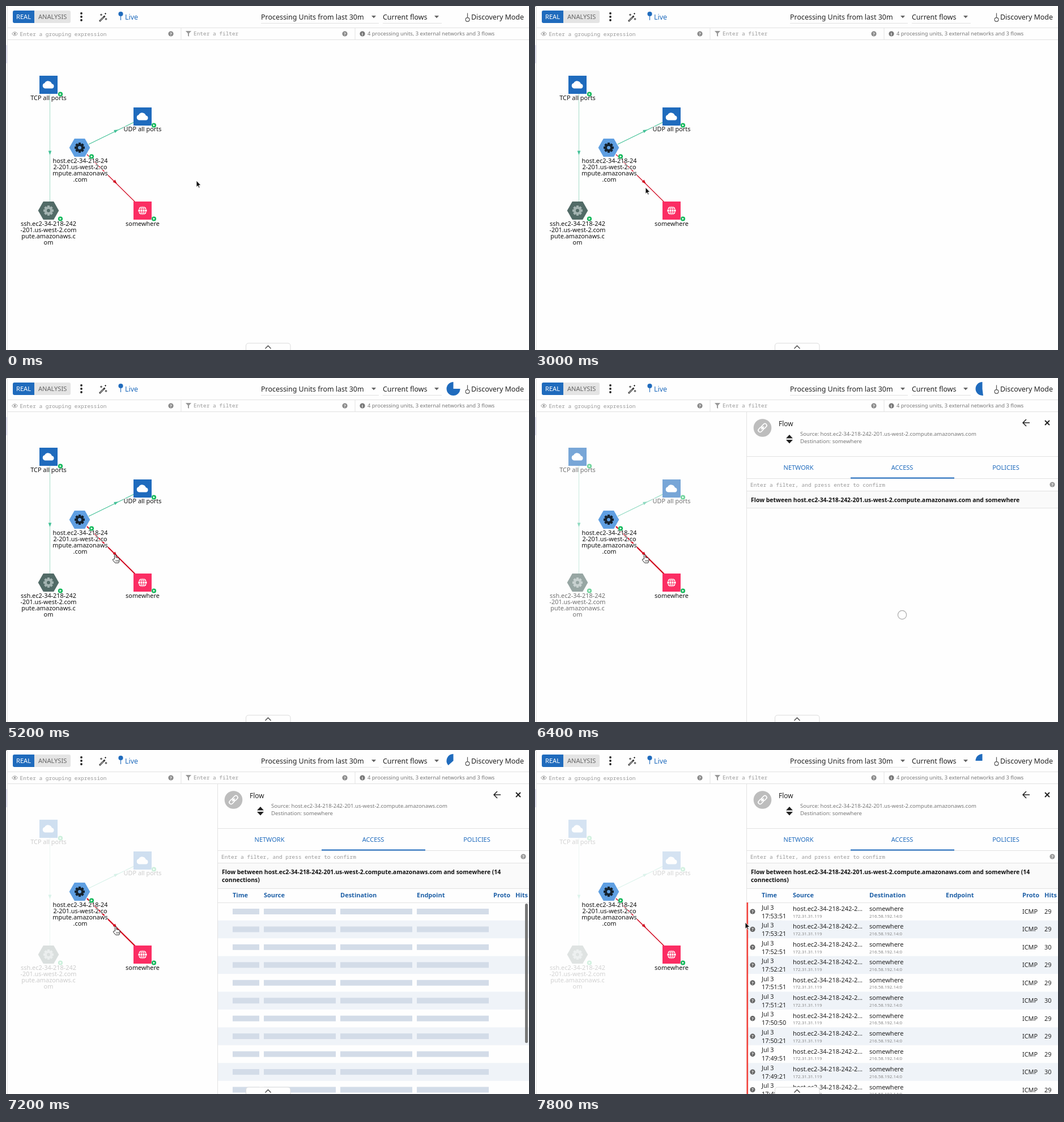
An HTML page for the animation above (8 s loop, 923x607 px).

```html
<!DOCTYPE html>
<html lang="en">
<head>
<meta charset="utf-8">
<title>Flow inspector</title>
<style>
  html, body { margin: 0; width: 100%; height: 100%; overflow: hidden; background: #fefefe; }
  svg { display: block; width: 923px; height: 607px; font-family: "Noto Sans", sans-serif; }
  .mono { font-family: "Noto Sans Mono", monospace; }
  .label { font-size: 10.9px; text-anchor: middle; paint-order: stroke; stroke: #fefefe; stroke-width: 2px; }
</style>
</head>
<body>
<svg id="stage" viewBox="0 0 923 607"></svg>
<script>
const BLUE = '#1f6bbd', LINE = '#e2e2e2', GREEN = '#43c197';
const HOST = 'host.ec2-34-218-242-201.us-west-2.compute.amazonaws.com';

const text = (x, y, size, str, fill = '#222', attrs = '') =>
  `<text x="${x}" y="${y}" font-size="${size}" fill="${fill}" ${attrs}>${str}</text>`;
const rect = (x, y, w, h, fill, attrs = '') =>
  `<rect x="${x}" y="${y}" width="${w}" height="${h}" fill="${fill}" ${attrs}/>`;
const circle = (x, y, r, fill, attrs = '') =>
  `<circle cx="${x}" cy="${y}" r="${r}" fill="${fill}" ${attrs}/>`;
const path = (d, fill = 'none', attrs = '') => `<path d="${d}" fill="${fill}" ${attrs}/>`;
const stroke = (color, width = 1) => `stroke="${color}" stroke-width="${width}"`;
const line = (d, color = LINE, width = 1) => path(d, 'none', stroke(color, width));
const group = (id, body, attrs = '') => `<g id="${id}" ${attrs}>${body}</g>`;
const at = (x, y, body, extra = '') => `<g transform="translate(${x} ${y}) ${extra}">${body}</g>`;
const mark = (x, y, sign, fill = '#8a8a8a') => circle(x, y, 4.6, fill) +
  text(x, y + 2.8, 7.5, sign, '#fff', 'text-anchor="middle" font-weight="700"');
const caret = x => path(`M${x - 4} 17h8l-4 4.5z`, '#666');

// Graph nodes
const badge = (x, y) => circle(x, y, 4.6, '#fff') + circle(x, y, 4.1, '#12b85a') +
  path(`M${x - 1.3} ${y - 2}l3.4 2l-3.4 2z`, '#fff');
const labels = (x, y, lines) => lines.map((s, i) => text(x, y + 11 * i, 10.9, s, '#111', 'class="label"')).join('');
const cloud = path('M-6 6.5a4.8 4.8 0 0 1-.7-9.4a6.8 6.8 0 0 1 12.6 1.2a4.2 4.2 0 0 1 .6 8.2z', '#fff');
const globe = circle(0, 0, 7.6, '#fff') +
  line('M-8 -2.6H8M-8 2.6H8M0-8V8M-1-8C-5-3-5 3-1 8M1-8C5-3 5 3 1 8', '#fb2d63', 1);
const gear = (fill, hole) => {
  const teeth = [0, 45, 90, 135].map(a => rect(-2.2, -9, 4.4, 18, fill, `rx="1" transform="rotate(${a})"`)).join('');
  return teeth + circle(0, 0, 6.8, fill) + circle(0, 0, 3, hole);
};
const square = (x, y, fill, icon) => at(x, y, rect(-16, -16, 32, 32, fill) + icon);
const hexagon = (x, y, fill, gearFill) =>
  at(x, y, path('M-18.3 0L-9.2-16H9.2L18.3 0L9.2 16H-9.2Z', fill) + gear(gearFill, fill));
const arrowHead = (x, y, angle, fill) => at(x, y, path('M4 0L-3.5-2.8V2.8Z', fill), `rotate(${angle})`);

const toolbar =
  line('M2.5 0V607M2 38.5H923M2 59.5H923M309 39V59M616 39V59') + rect(0, 69, 2, 32, '#e3e3f2') +
  rect(12, 8, 102, 22, '#e4e4e4', 'rx="3"') + path('M15 8H50V30H15a3 3 0 0 1-3-3V11a3 3 0 0 1 3-3z', BLUE) +
  text(18, 23, 11.1, 'REAL', '#fff') + text(57, 23, 11.1, 'ANALYSIS', '#666') +
  [13, 19, 25].map(y => circle(133, y, 1.9, '#222')).join('') +
  line('M165 27L174.5 17.5', '#333', 2.8) + line('M166 26L172 20', '#fff', .9) +
  line('M168 13.5v4M166 15.5h4M175.5 12v3M174 13.5h3M176.500 21v4M174.500 23h4', '#333', 1.1) +
  line('M202.500 14V25', BLUE, 1.1) + circle(202.5, 14, 4.1, BLUE) + text(210, 23.5, 12.45, 'Live', BLUE) +
  text(450, 23.5, 12.45, 'Processing Units from last 30m') + caret(649) +
  text(665, 23.5, 12.45, 'Current flows') + caret(760) +
  line('M450 30.500H658M665 30.500H769') +
  line('M814.500 12.500V20', '#555', 1.2) + circle(814.5, 24, 3.4, 'none', stroke('#555', 1.2)) +
  text(821, 23.5, 12.45, 'Discovery Mode') +
  path('M10.500 49Q15.500 42.500 20.500 49Q15.500 55.500 10.500 49Z', 'none', stroke('#999', 1)) + circle(15.5, 49, 1.8, '#999') +
  text(24.5, 52.5, 9.45, 'Enter a grouping expression', '#999', 'class="mono"') + mark(291, 49, '?') +
  path('M317 44h10l-4 4.500v5.500l-2-1.500v-4z', '#999') +
  text(331, 51.8, 9.45, 'Enter a filter', '#999', 'class="mono"') + mark(598, 49, '?') +
  mark(629, 49, 'i', '#777') +
  text(638, 52.2, 9.37, '4 processing units, 3 external networks and 3 flows', '#777');

const idleGraph =
  line('M77.500 155V346', '#9bd9c2', .9) + arrowHead(77.5, 259, 90, GREEN) +
  line('M146 244L226 205', GREEN, 1.1) + arrowHead(194.5, 220, -26, GREEN) +
  square(75, 139, BLUE, cloud) + labels(75, 166, ['TCP all ports']) + badge(96, 155.5) +
  square(241, 195, BLUE, cloud) + labels(241, 221, ['UDP all ports']) + badge(261, 210.5) +
  hexagon(75, 361, '#526b67', '#a3b3b1') +
  labels(75, 387.5, ['ssh.ec2-34-218-242', '-201.us-west-2.com', 'pute.amazonaws.c', 'om']) + badge(96, 375.5);

const activeGraph =
  path('M143 262L228 346', 'none', 'id="edge" stroke="#d0021b"') + arrowHead(193, 311, 45, '#d0021b') +
  hexagon(130, 250, '#5f9fe2', '#14222f') +
  labels(131, 277, ['host.ec2-34-218-24', '2-201.us-west-2.co', 'mpute.amazonaws', '.com']) + badge(151, 265.5) +
  square(241, 361, '#fb2d63', globe) + labels(241, 387.5, ['somewhere']) + badge(261, 375.5);

// Side panel
const tab = (x, name) => text(x, 162, 11, name, BLUE, 'text-anchor="middle" font-weight="500"');
const bold = 'font-weight="700"';
const panelHead =
  rect(373, 60, 550, 547, '#fefefe') + line('M373.500 60V607M374 138.500H923M374 177.500H923M374 199.500H923') +
  circle(401.5, 88, 15.8, '#bdbdbd') +
  at(401.5, 88, ['-4.2', '4.2'].map(x =>
    `<rect x="${x - 5}" y="-3.2" width="10" height="6.4" rx="3.2" fill="none" ${stroke('#fff', 1.7)}/>`).join('') +
    line('M-3.500 0H3.500', '#fff', 1.7), 'rotate(-45)') +
  text(430, 85, 11.9, 'Flow') + path('M443 106.500l6-6.500l6 6.500zM443 109l6 6.500l6-6.500z', '#222') +
  text(468, 101.5, 9.54, 'Source: ' + HOST, '#777') + text(468, 114.8, 9.54, 'Destination: somewhere', '#777') +
  line('M873 79H861.500M867 73L861 79L867 85', '#222', 1.5) + line('M900 75L908 83M908 75L900 83', '#222', 2) +
  tab(465, 'NETWORK') + tab(648, 'ACCESS') + tab(831, 'POLICIES') + rect(557, 175.5, 183, 2, BLUE) +
  text(380, 191.5, 9.45, 'Enter a filter, and press enter to confirm', '#999', 'class="mono"') + mark(913, 188, '?', '#999');

const title = 'Flow between ' + HOST + ' and somewhere';
const loading = rect(374, 200, 549, 29, '#fafafa') + line('M374 229.500H923') +
  text(381, 218.5, 10.43, title, '#111', bold) + circle(648, 418, 7.6, 'none', stroke('#aaa', 1.2));

const ROW = 31.45, rowCenter = i => 285 + ROW * i;
const rows = make => Array.from({ length: 11 }, (_, i) => make(rowCenter(i), i)).join('');
const columns = [[400, 'Time'], [455, 'Source'], [590, 'Destination'], [725, 'Endpoint'], [860, 'Proto'], [899, 'Hits']];
const table = rect(374, 200, 549, 44, '#fafafa') + line('M374 244.500H923M374 269.500H923') +
  text(381, 218.5, 10.43, title + ' (14', '#111', bold) + text(381, 233, 10.43, 'connections)', '#111', bold) +
  columns.map(([x, name]) => text(x, 260.2, 11, name, '#1d5fa6', bold)).join('') +
  rows((y, i) => i % 2 ? rect(374, y - ROW / 2, 549, ROW, '#eff3f8') : '');

const bars = [[400, 47], [455, 127], [590, 127], [725, 127]];
const skeleton = rows(y => bars.map(([x, w]) => rect(x, y - 5, w, 10, '#d3dce8')).join(''));

const times = '53:51 53:21 52:51 52:21 51:51 51:21 50:50 50:21 49:51 49:21 48:51'.split(' ');
const longPings = [2, 5, 9];
const records = rect(373.5, 269, 2.6, 338, '#f4433c') + rows((y, i) =>
  mark(384, y, '?', '#666') + text(400, y - 3.3, 10.9, 'Jul 3') + text(400, y + 11.6, 10.9, '17:' + times[i]) +
  text(455, y - 1, 11, HOST.slice(0, 21) + '...') + text(455, y + 10.6, 7.9, '172.31.31.119', '#888') +
  text(590, y - 1, 11, 'somewhere') + text(590, y + 10.6, 7.9, '216.58.192.14:0', '#888') +
  text(860, y + 4, 10.9, 'ICMP') + text(899, y + 4, 10.9, longPings.includes(i) ? 30 : 29));

const drawer = path('M423.500 608V600q0-5 5-5H497q5 0 5 5V608z', '#fefefe', stroke('#dcdcdc')) +
  line('M457.500 604.500L462.500 599.500L467.500 604.500', '#444', 1.4);
const pointer = path('M0 0V11.500L2.600 9.200L4.400 13.200L6.200 12.400L4.500 8.500H8Z', '#111', stroke('#fff', .9));
const hand = path('M-1.600 8V1.300a1.300 1.300 0 0 1 2.600 0V5.500q1.200-1 2.100.3q1.200-.7 2 .4q1.600-.3 1.800 1.200v3q0 2-1.300 4.300H-.5L-4.500 9.800q-.6-1.900 1.200-1.700z',
  '#fff', stroke('#222', 1)) + line('M1 9.500v3M3 9.500v3M4.800 9.500v3', '#222', .7);

const stage = document.getElementById('stage');
stage.innerHTML = group('corner', rect(0, 0, 1, 1, '#222')) + toolbar + path('', BLUE, 'id="pie"') +
  group('idle', idleGraph) + group('active', activeGraph) +
  group('panel', panelHead + group('loading', loading) +
    group('table', table + group('skeleton', skeleton) + group('records', records) +
      rect(916, 271, 5, 246, '#777', 'id="scrollbar" rx="2.5"'))) +
  drawer + group('pointer', pointer) + group('hand', hand);

const el = Object.fromEntries([...stage.querySelectorAll('[id]')].map(node => [node.id, node]));
const show = (name, visible) => el[name].setAttribute('display', visible ? 'inline' : 'none');

// Mouse path: time, x, y
const track = [
  [0, 336, 308], [200, 400, 335], [400, 530, 375], [600, 588, 385], [800, 490, 345], [1000, 350, 300],
  [1200, 260, 287], [1400, 264, 290], [2400, 195, 320], [2600, 198, 327], [3000, 195, 320],
  [3600, 194, 314], [4000, 193, 311.5], [5200, 193, 311.5], [6400, 194, 311.5], [7400, 194, 311.5], [7800, 371, 304]
];
function mouseAt(t) {
  const i = track.findIndex(([time]) => time >= t);
  if (i <= 0) return track[0].slice(1);
  const [t0, x0, y0] = track[i - 1], [t1, x1, y1] = track[i], k = (t - t0) / (t1 - t0);
  return [x0 + (x1 - x0) * k, y0 + (y1 - y0) * k];
}

// Countdown pie: the wedge still left, clockwise up to twelve o'clock
function piePath(t) {
  const degrees = (t - 3900) * 180 / 2600, a = degrees * Math.PI / 180, r = 12;
  return `M789.5 19L${789.5 + r * Math.sin(a)} ${19 - r * Math.cos(a)}A${r} ${r} 0 ${degrees < 180 ? 1 : 0} 1 789.5 7Z`;
}

function render(t) {
  const hovering = t >= 4000 && t < 7600;
  const selected = t >= 6400;
  show('corner', t >= 200);
  show('pie', t >= 4000);
  if (t >= 4000) el.pie.setAttribute('d', piePath(t));
  el.idle.setAttribute('opacity', selected ? .18 + .82 * Math.exp((6200 - t) / 300) : 1);
  el.edge.setAttribute('stroke-width', t < 4000 ? 1.1 : t < 6400 ? 1.8 : t < 7600 ? 2.3 : 1.5);
  show('panel', selected);
  show('loading', t < 7200);
  show('table', t >= 7200);
  show('skeleton', t < 7400);
  show('records', t >= 7400);
  show('scrollbar', t < 7800);
  show('pointer', !hovering);
  show('hand', hovering);
  el[hovering ? 'hand' : 'pointer'].setAttribute('transform', `translate(${mouseAt(t)})`);
}

const LOOP = 8000, STEP = 200, start = performance.now();
function tick() {
  const t = (performance.now() - start) % LOOP;
  render(Math.floor(t / STEP) * STEP);
  requestAnimationFrame(tick);
}
tick();
</script>
</body>
</html>
```
